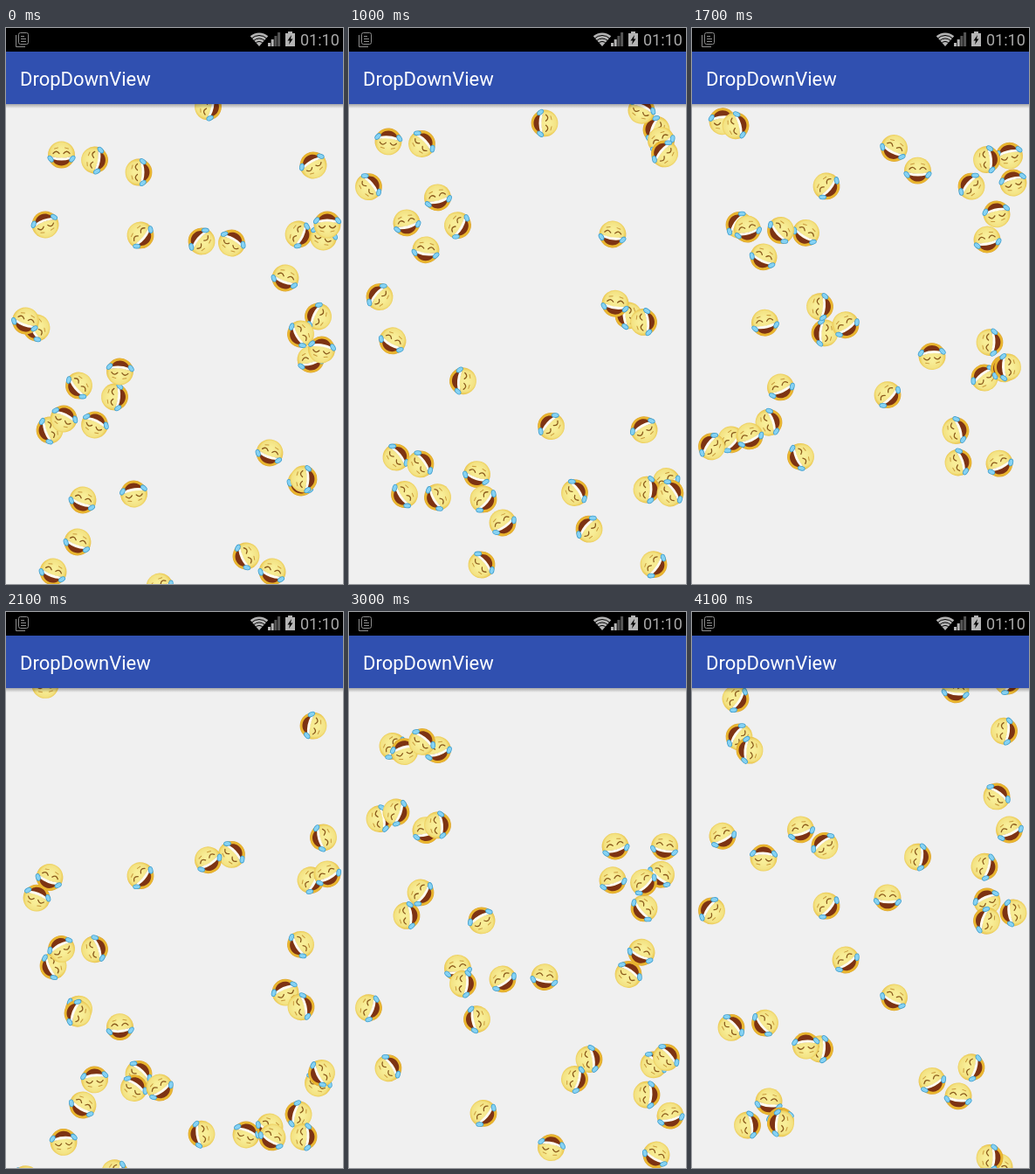
An HTML page with a canvas that plays this animation: 386 by 636 pixels, repeating every 4200 ms.

```html
<!DOCTYPE html>
<html>
<head>
<meta charset="utf-8">
<style>
html, body { margin: 0; width: 100%; height: 100%; overflow: hidden; background: #f0f0f0; }
canvas { display: block; }
</style>
</head>
<body>
<canvas id="stage" width="386" height="636"></canvas>
<script>
const ctx = document.getElementById('stage').getContext('2d');
const LOOP = 4200, STEP = 100, BAR_BOTTOM = 87, TOP = 71;

// Each group: spin in degrees per second, then drops as [x, y, speed, angle = 20]
const groups = [
  [65, [35, 343, 551, 65], [275, 604, 556, 65], [320, 286, 635]],
  [320, [50, 460, 479.4, 70], [224, 244, 444, 130], [352, 157, 545.4, 150],
    [152, 165, 449, -90], [349, 379, 234.6, -16]],
  [348, [302, 486, 320.8], [88, 540, 282], [305, 622, 259.8]],
  [-335, [45, 225, 487, 160], [124.5, 422, 378.3, -85], [258.5, 246, 285.6, 210]],
  [-150, [54, 622, 448.5], [22.5, 335, 424.5], [146.5, 533, 565, 170], [231.5, 90, 365.5, -78]],
  [-90, [130.5, 393, 600.6, 185], [335, 236, 436.9, -65]],
  [-230, [338, 520, 524.3], [363.5, 239, 279.5, 198]],
  [0, [154, 237, 302, -50], [176, 639, 510.7, -35], [341, 516, 602, -88]],
  [415, [63.5, 145, 388.5, 0], [368, 225, 307, 180]],
  [500, [66, 447, 348.6, 205], [101.5, 151, 385.7, -80], [101.5, 454, 310, 205]],
  [176, [83.5, 409, 292.4, 50]],
  [215, [82, 588, 493.5], [357.5, 330, 373, 115]],
  [-515, [337.5, 350, 574.5, 60]],
  [-60, [361.5, 368, 348.6, 190]]
];

function shape(color, trace) {
  ctx.beginPath();
  trace();
  ctx.fillStyle = color;
  ctx.fill();
}

function line(color, width, trace) {
  ctx.beginPath();
  trace();
  ctx.strokeStyle = color;
  ctx.lineWidth = width;
  ctx.stroke();
}

const skin = ctx.createRadialGradient(0, -4, 2, 0, -1, 16);
skin.addColorStop(0, '#f8ee98');
skin.addColorStop(0.7, '#f3e283');
skin.addColorStop(0.9, '#eccb55');
skin.addColorStop(1, '#dca73c');

function drawFace(x, y, degrees) {
  ctx.save();
  ctx.translate(x, y);
  ctx.rotate(degrees * Math.PI / 180);
  ctx.lineCap = 'round';
  shape(skin, () => ctx.arc(0, 0, 15.4, 0, 7));
  shape('#e9b52e', () => {
    ctx.moveTo(-13, 3);
    ctx.quadraticCurveTo(0, 5, 13, 3);
    ctx.bezierCurveTo(12, 19, -12, 19, -13, 3);
  });
  shape('#7d3313', () => {
    ctx.moveTo(-11, 2);
    ctx.quadraticCurveTo(0, 6, 11, 2);
    ctx.bezierCurveTo(10, 16, -10, 16, -11, 2);
  });
  shape('#fffdf2', () => {
    ctx.moveTo(-11, 2);
    ctx.quadraticCurveTo(0, 5, 11, 2);
    ctx.lineTo(10, 5);
    ctx.quadraticCurveTo(0, 8, -10, 5);
  });
  for (const side of [-1, 1]) {
    line('#8a5a1c', 1.3, () => {
      ctx.moveTo(side * 2.5, -1.5);
      ctx.quadraticCurveTo(side * 6, -6, side * 9.5, -1.5);
    });
    line('#c99a3c', 1, () => {
      ctx.moveTo(side * 4, -8);
      ctx.lineTo(side * 8, -7);
    });
    shape('#3f9fd0', () => ctx.ellipse(side * 12.4, 4.8, 4.4, 2.8, -side * 0.9, 0, 7));
    shape('#86d2f3', () => ctx.ellipse(side * 12.4, 4.8, 3.6, 2, -side * 0.9, 0, 7));
  }
  ctx.restore();
}

function drawDrops(seconds) {
  for (const [spin, ...drops] of groups) {
    for (const [x, y, speed, angle = 20] of drops) {
      const lap = 549 + speed * 0.068;
      drawFace(x, TOP + (y - TOP + speed * seconds) % lap, angle + spin * seconds);
    }
  }
}

function drawStatusBar() {
  ctx.fillStyle = '#000';
  ctx.fillRect(0, 0, 386, 27);

  // Document
  ctx.lineCap = 'butt';
  line('#8c8c8c', 1, () => {
    ctx.roundRect(14.5, 5.5, 11, 13, 2);
    ctx.moveTo(11.5, 8);
    ctx.lineTo(11.5, 21.5);
    ctx.lineTo(22, 21.5);
    for (const y of [9.5, 12.5, 15.5]) {
      ctx.moveTo(17, y);
      ctx.lineTo(y < 10 ? 21 : 23, y);
    }
  });

  // Wi-Fi
  shape('#b4b4b4', () => {
    ctx.moveTo(290, 21);
    ctx.arc(290, 21, 15.5, -Math.PI * 0.73, -Math.PI * 0.27);
  });
  for (const r of [5.5, 9, 12.5]) {
    line('#000', 1, () => ctx.arc(290, 21, r, -Math.PI * 0.75, -Math.PI * 0.25));
  }

  // Signal
  for (let i = 0; i < 4; i++) {
    ctx.fillStyle = i < 2 ? '#b4b4b4' : '#555';
    ctx.fillRect(300 + i * 3.7, 17 - i * 4, 3, 4 + i * 4);
  }

  // Battery
  ctx.fillStyle = '#b4b4b4';
  ctx.fillRect(323, 4, 5, 2);
  ctx.fillRect(320, 6, 11, 15);
  shape('#000', () => {
    ctx.moveTo(327, 8);
    ctx.lineTo(322.5, 14.5);
    ctx.lineTo(325, 14.5);
    ctx.lineTo(324, 19);
    ctx.lineTo(328.5, 12.5);
    ctx.lineTo(326, 12.5);
  });

  ctx.font = '18px Roboto, sans-serif';
  ctx.fillStyle = '#a8a8a8';
  ctx.fillText('01:10', 337, 20);
}

const shadow = ctx.createLinearGradient(0, BAR_BOTTOM, 0, BAR_BOTTOM + 5);
shadow.addColorStop(0, 'rgba(0,0,0,.3)');
shadow.addColorStop(1, 'rgba(0,0,0,0)');

function drawAppBar() {
  ctx.fillStyle = '#3050b0';
  ctx.fillRect(0, 27, 386, BAR_BOTTOM - 27);
  ctx.fillStyle = shadow;
  ctx.fillRect(0, BAR_BOTTOM, 386, 5);
  ctx.font = '22px Roboto, sans-serif';
  ctx.fillStyle = '#fff';
  ctx.fillText('DropDownView', 16, 66);
}

function frame() {
  const time = performance.now() % LOOP;
  ctx.fillStyle = '#f0f0f0';
  ctx.fillRect(0, 0, 386, 636);
  drawDrops(Math.floor(time / STEP) * STEP / 1000);
  drawAppBar();
  drawStatusBar();
  requestAnimationFrame(frame);
}
frame();
</script>
</body>
</html>
```
